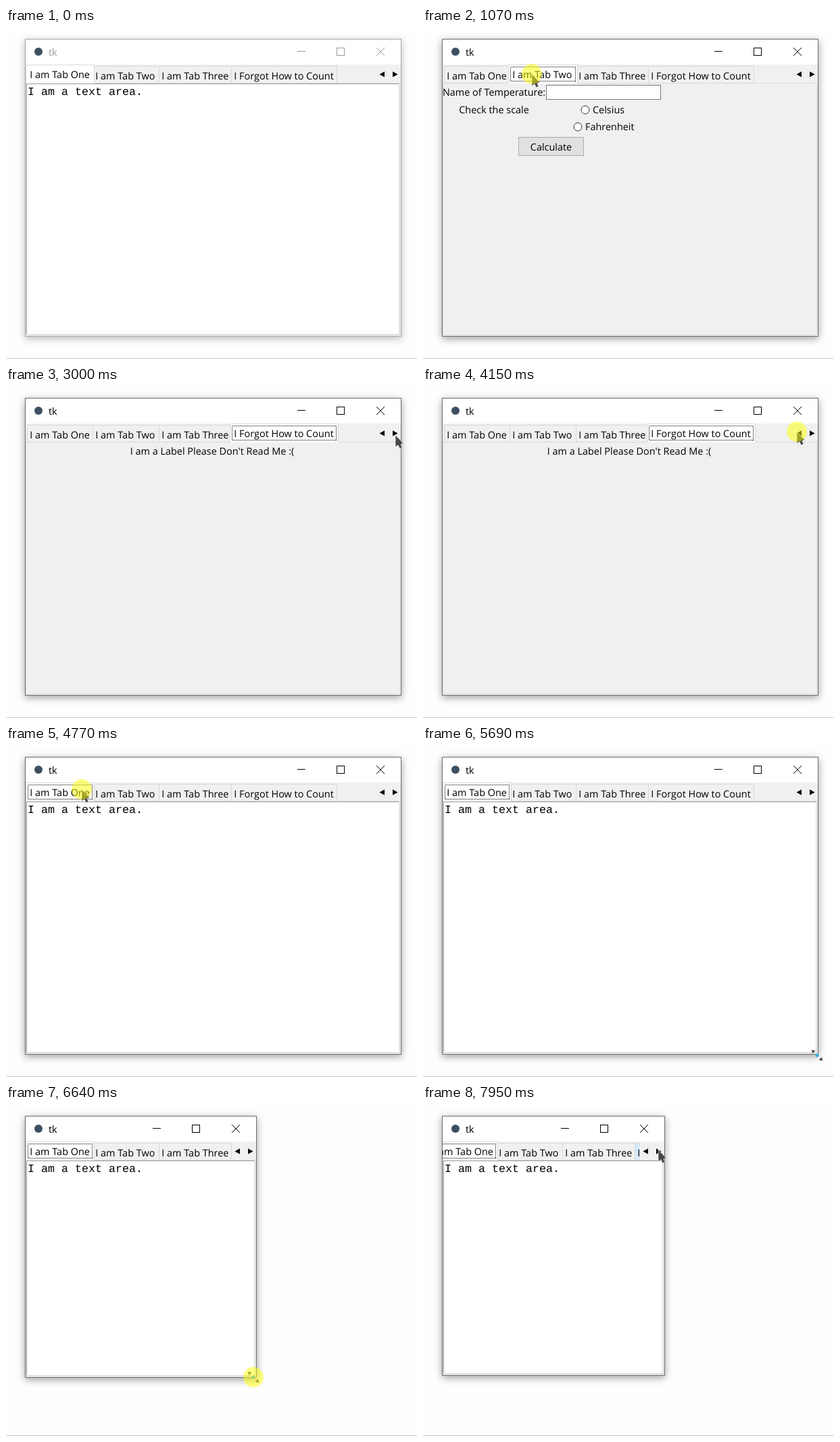
These frames come from a looping animation (608x489 px, 8000 ms). An HTML page:

```html
<!DOCTYPE html>
<html lang="en">
<head>
<meta charset="utf-8">
<title>Notebook window</title>
<style>
  html, body { margin: 0; width: 100%; height: 100%; overflow: hidden; background: #fefefe; }
  #stage { display: block; width: 608px; height: 489px; }
  text { font: 14.45px "Open Sans", "Noto Sans", sans-serif; text-rendering: geometricPrecision; }
  .mono { font: 16.667px "Liberation Mono", "Courier New", monospace; }
  .mid { text-anchor: middle; }
  rect { shape-rendering: crispEdges; }
</style>
</head>
<body>
<svg id="stage" viewBox="0 0 608 489"></svg>
<script>
const LOOP = 8000, TICK = 76.7;         // the screen is sampled once per tick
const HOLD = 75, REPEAT = 155;          // length of a click, time between repeated clicks
const LEFT = 28, TOP = 16;
const OPEN = { x: 584, y: 455 }, SMALL = { x: 357, y: 399 };  // window corner
const stage = document.getElementById('stage');

const clamp = u => Math.min(1, Math.max(0, u));
const easeInOut = u => u * u * (3 - 2 * u);
const easeOut = u => 1 - (1 - u) ** 2;
const mix = (a, b, u) => ({
  x: Math.round(a.x + (b.x - a.x) * u),
  y: Math.round(a.y + (b.y - a.y) * u)
});

const TABS = [
  { label: 'I am Tab One', w: 97 },
  { label: 'I am Tab Two', w: 98 },
  { label: 'I am Tab Three', w: 107 },
  { label: 'I Forgot How to Count', w: 156 }
];
TABS.reduce((x, tab) => (tab.x = x) + tab.w, 31);

// What the user does: press at a time and place.
const ACTS = [
  { at: 1040, x: 161, y: 68, tab: 1 },
  { at: 1890, x: 274, y: 71, tab: 2 },
  { at: 2500, x: 400, y: 68, tab: 3 },
  { at: 3115, x: 576, y: 71, clicks: 3 },
  { at: 3960, x: 553, y: 66, clicks: 2 },
  { at: 4725, x: 112, y: 64, tab: 0 },
  { at: 5872, x: 583, y: 457, drag: { x: 361, y: 401 }, time: 850 },
  { at: 7565, x: 348, y: 66, scroll: 20 }
];
const DRAG = ACTS.find(act => act.drag);

// After each act the pointer leaves at once; longer ways take longer.
let from = { x: 476, y: 416 }, free = 70;
for (const act of ACTS) {
  act.from = from;
  act.leave = free;
  act.travel = Math.min(act.at - free, 200 + 1.1 * Math.hypot(act.x - from.x, act.y - from.y));
  act.end = act.at + (act.time || ((act.clicks || 1) - 1) * REPEAT + HOLD);
  from = act.drag || act;
  free = act.end;
}

const pull = t => easeOut(clamp((t - DRAG.at) / DRAG.time));
const latest = (key, t) => ACTS.filter(act => key in act && act.at <= t).pop()?.[key] ?? 0;

function mouse(t) {
  const act = ACTS.find(a => t < a.end) || ACTS[ACTS.length - 1];
  if (t < act.at) return mix(act.from, act, easeInOut(clamp((t - act.leave) / act.travel)));
  return act.drag ? mix(act, act.drag, pull(t)) : act;
}

const pressed = t => ACTS.some(act =>
  t >= act.at && t < act.end && (act.drag || (t - act.at) % REPEAT < HOLD));

const rect = (x, y, w, h, fill) =>
  `<rect x="${x}" y="${y}" width="${w}" height="${h}" fill="${fill}"/>`;
const frame = (x, y, w, h, stroke, fill = 'none', extra = '') =>
  `<rect x="${x + .5}" y="${y + .5}" width="${w - 1}" height="${h - 1}" fill="${fill}" stroke="${stroke}" ${extra}/>`;
const text = (x, y, s, cls = '', fill = '#000') =>
  `<text x="${x}" y="${y}" fill="${fill}" class="${cls}">${s}</text>`;
const path = (d, attrs) => `<path d="${d}" ${attrs}/>`;
const ring = (x, y, r, attrs) => `<circle cx="${x}" cy="${y}" r="${r}" ${attrs}/>`;

function titleBar(right, active) {
  const ink = active ? '#000' : '#999';
  return rect(LEFT + 1, TOP + 1, right - LEFT - 1, 37, '#fff') +
    ring(48, 35, 6, 'fill="#3d5062"') +
    text(63, 41, 'tk', '', ink) +
    rect(right - 153, 34, 12, 1, ink) +
    frame(right - 95, 29, 12, 12, ink) +
    path(`M${right - 36} 29l12 12m0 -12l-12 12`, `stroke="${ink}" fill="none"`);
}

function tab({ label, x, w }, selected, hover, focus) {
  if (!selected) {
    return frame(x, 56, w + 1, 26, '#d9d9d9', hover ? '#d8eaf9' : '#f0f0f0') +
      text(x + 4.3, 76, label);
  }
  return frame(x - 2, 54, w + 5, 29, '#d9d9d9', '#fff') +
    rect(x - 1, 81, w + 3, 2, '#fff') +
    (focus ? frame(x + 1, 57, w - 1, 22, '#000', 'none', 'stroke-dasharray="1 1"') : '') +
    text(x + 4.3, 74, label);
}

function tabStrip(right, chosen, focus, scroll, { x, y }) {
  const width = right - 36 - 29, at = x + scroll;
  const draw = item => {
    const hover = y > 56 && y < 82 && at >= item.x && at < item.x + item.w;
    return tab(item, item === TABS[chosen], hover, focus);
  };
  const rest = TABS.filter((item, i) => i !== chosen).map(draw).join('');
  return `<svg x="29" y="54" width="${width}" height="28" viewBox="${29 + scroll} 54 ${width} 28">` +
    rest + draw(TABS[chosen]) + '</svg>' +
    path(`M${right - 24} 64.2v8.4l-7.6 -4.2zM${right - 12} 64.2v8.4l7.6 -4.2z`, 'fill="#000"');
}

const radio = (x, y, label) =>
  ring(x, y, 6, 'fill="#fff" stroke="#333"') + text(x + 11, y + 5, label);

const PAGES = [
  ({ x, y }) => {
    const w = x - 33, h = y - 85;
    return rect(30, 82, w + 1, h + 1, '#e3e3e3') +
      rect(30, 82, w, h, '#9a9a9a') +
      rect(31, 83, w - 1, h - 1, '#fff') +
      text(32, 98.6, 'I am a text area.', 'mono');
  },
  () => text(105, 100, 'Name of Temperature:', 'mid') +
    frame(182, 84, 170, 22, '#7a7a7a', '#fff') +
    text(105, 126, 'Check the scale', 'mid') +
    radio(240, 121, 'Celsius') +
    radio(229, 146, 'Fahrenheit') +
    frame(141, 161, 97, 28, '#adadad', '#e1e1e1') +
    text(189.5, 181, 'Calculate', 'mid'),
  () => frame(178, 253, 255, 28, '#adadad', '#e1e1e1') +
    text(305.5, 273, "I am a Button Please Don't Click Me :(", 'mid'),
  () => text(305, 100, "I am a Label Please Don't Read Me :(", 'mid')
];

function pointer({ x, y }, resizing) {
  const look = 'fill="#474747" stroke="#fff" stroke-width=".6"';
  const shape = resizing
    ? path('M-8.5 -8.5l6.5 1.5l-5 5zM8.5 8.5l-6.5 -1.5l5 -5z', look) + ring(0, 0, 2.5, 'fill="#29abe2"')
    : path('M0 0V17.5L4 14.8L6.5 20L10 18.3L8 13.8L11.5 12Z', look);
  return `<g transform="translate(${x} ${y})">${shape}</g>`;
}

function render(now) {
  const t = Math.floor(now / TICK + .15) * TICK;
  const spot = mouse(t);
  const corner = mix(OPEN, SMALL, pull(t - TICK));  // the window trails the pointer
  const { x: right, y: bottom } = corner;
  const chosen = latest('tab', t);
  const active = t > ACTS[0].at;
  const resizing = t >= DRAG.leave + DRAG.travel - TICK / 2 && t < DRAG.end + TICK;
  const shadow = `style="filter:drop-shadow(0 3px 6px rgba(0,0,0,${active ? .38 : .27}))"`;

  stage.innerHTML =
    rect(0, 488, 608, 1, '#c9c9c9') +
    frame(LEFT, TOP, right - LEFT + 1, bottom - TOP + 1, active ? '#6e6e6e' : '#a6a6a6', '#f0f0f0', shadow) +
    titleBar(right, active) +
    frame(29, 81, right - 30, bottom - 82, '#dcdcdc') +
    tabStrip(right, chosen, active, latest('scroll', t), spot) +
    PAGES[chosen](corner) +
    (t > 50 ? pointer(spot, resizing) : '') +
    (pressed(t) ? ring(spot.x, spot.y, 15, 'fill="#ff0" fill-opacity=".5"') : '');
}

function loop() {
  render(performance.now() % LOOP);
  requestAnimationFrame(loop);
}
loop();
</script>
</body>
</html>
```
